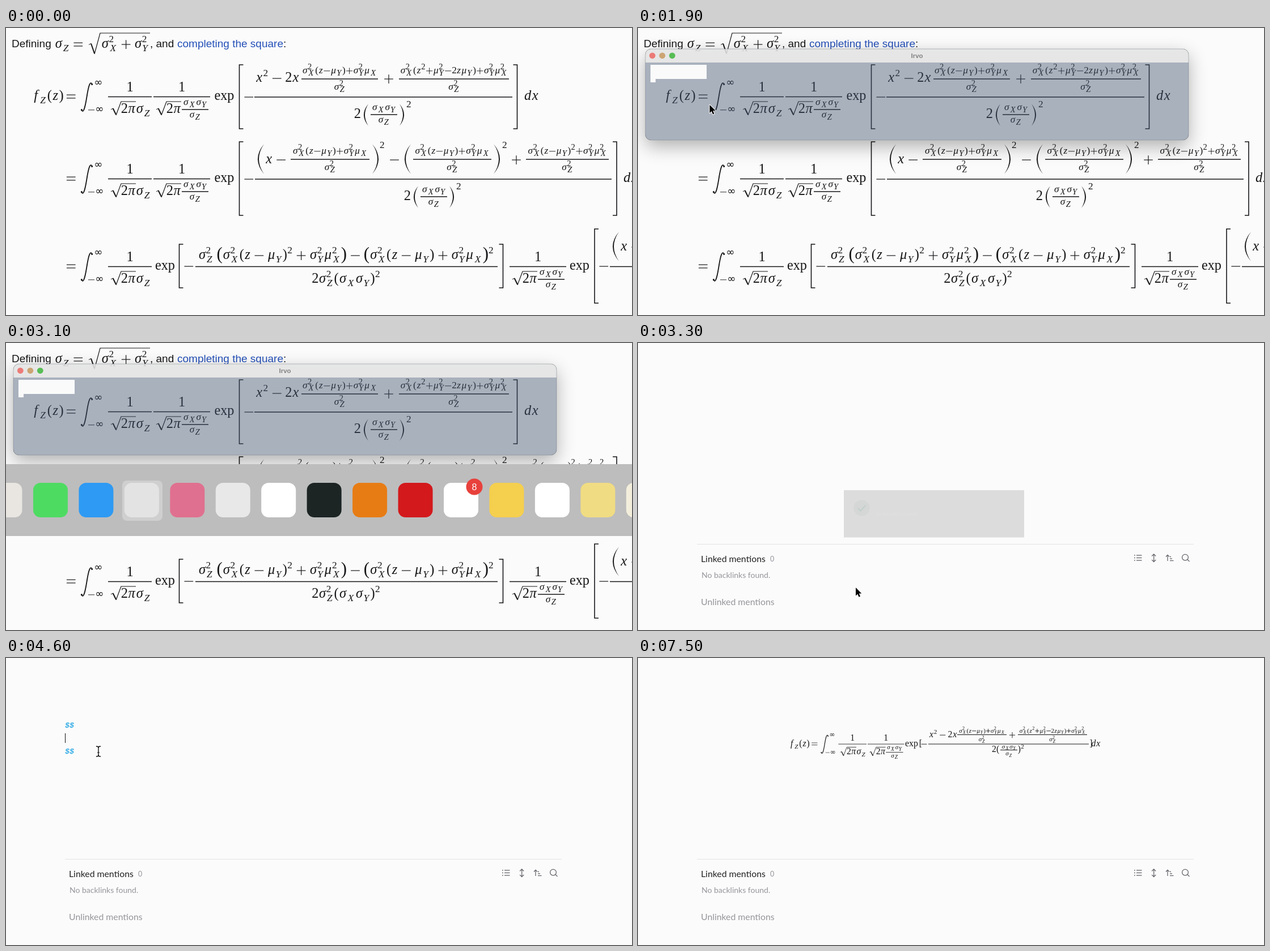
Write an HTML page with a canvas that moves like this. It is 1104 px wide and 507 px high and loops after 7600 ms.

```html
<!DOCTYPE html>
<html lang="en">
<meta charset="utf-8">
<title>Formula capture</title>
<style>
html, body { margin: 0; height: 100%; overflow: hidden; background: #fbfbfb }
canvas { display: block }
</style>
<canvas id="stage" width="1104" height="507"></canvas>
<script>
const c = document.getElementById('stage').getContext('2d');
const SANS = '"Liberation Sans", sans-serif', SERIF = '"Liberation Serif", serif';
const HAND = 'Lato, sans-serif', MONO = '"Liberation Mono", monospace';
const INK = '#161618', LOOP = 7600, STEP = 100, EM = 23.8, SCRIPT = 16.8;

// Advance widths in em for mathematical setting
const ADV = { σ: .571, μ: .603, π: .57, X: .85, Y: .64, Z: .71, x: .572, z: .48, f: .55, d: .52,
  '(': .389, ')': .389, '{': .458, '}': .458, '+': .778, '−': .778, '=': .778, '∞': .95, ' ': .222 };

function text(s, x, y, font, color = INK, align = 'left') {
  c.font = font; c.fillStyle = color; c.textAlign = align;
  c.fillText(s, x, y);
}
function box(x, y, w, h, color, r = 0) {
  c.fillStyle = color;
  c.beginPath(); c.roundRect(x, y, w, h, r); c.fill();
}
function disc(x, y, r, color) {
  c.fillStyle = color;
  c.beginPath(); c.arc(x, y, r, 0, 7); c.fill();
}
function line(pts, w = 1.3, color = INK) {
  c.strokeStyle = color; c.lineWidth = w;
  c.beginPath(); pts.forEach(p => c.lineTo(...p)); c.stroke();
}
const bar = (x1, x2, y, w = 1.3) => line([[x1, y], [x2, y]], w);

function glyph(ch, x, y, z) {
  const a = y - .25 * z, h = .33 * z, t = Math.max(.9, .05 * z);
  if (ch === ' ') return;
  if (ch === '=') { bar(x - h, x + h, a - .12 * z, t); bar(x - h, x + h, a + .12 * z, t); return; }
  if (ch === '−' || ch === '+') {
    bar(x - h, x + h, a, t);
    if (ch === '+') line([[x, a - h], [x, a + h]], t);
    return;
  }
  if (ch === '∞') return text(ch, x, y, `${z * 1.1}px "DejaVu Sans", sans-serif`, INK, 'center');
  if (ch === '{' || ch === '}') return text(ch === '{' ? '(' : ')', x, y + z * .06, `${z * 1.3}px ${SERIF}`, INK, 'center');
  const slant = /[a-zσμπ]/i.test(ch) ? 'italic ' : '';
  text(ch, x, y, `${slant}${z * 1.03}px ${SERIF}`, INK, 'center');
}
// Sets "a_b^c" markup from x on the baseline y; returns the right end
function run(s, x, y, z = EM, k = .707, draw = true) {
  let end = x;
  for (const [, mark, ch] of s.matchAll(/([_^]?)(.)/g)) {
    const q = mark ? z * k : z, w = (ADV[ch] || .5) * q;
    if (!mark) x = end;
    const dy = mark === '^' ? -.4 * z : mark ? .25 * z : 0;
    if (draw) glyph(ch, x + w / 2, y + dy, q);
    end = Math.max(end, x + w + (mark ? .05 * z : 0));
    if (!mark) x = end;
  }
  return end;
}
const mid = (s, x, y, z, k) => run(s, x - run(s, 0, 0, z, k, false) / 2, y, z, k);

function frac(x1, x2, y, num, den, up = 10, down = 19, z = SCRIPT, k = .84) {
  bar(x1, x2, y, z < 14 ? 1 : 1.3);
  mid(num, (x1 + x2) / 2, y - up, z, k);
  mid(den, (x1 + x2) / 2, y + down, z, k);
}
function bracket(x, y1, y2, dir) {
  line([[x + 7 * dir, y1], [x, y1], [x, y2], [x + 7 * dir, y2]], 1.6);
}
function paren(tip, bulge, y1, y2) {
  const m = (y1 + y2) / 2, k = 2 * bulge - tip, t = Math.sign(tip - bulge) * 4;
  c.fillStyle = INK;
  c.beginPath(); c.moveTo(tip, y1);
  c.quadraticCurveTo(k, m, tip, y2);
  c.quadraticCurveTo(k + t, m, tip, y1);
  c.fill();
}
function surd(x, w, x2, top, bot) {
  const m = bot - (bot - top) * .5;
  line([[x, m + 2], [x + w * .2, m]], 1);
  line([[x + w * .2, m], [x + w * .5, bot - 1]], 2);
  line([[x + w * .5, bot], [x + w, top], [x2, top]], 1.2);
}
function integral() {
  c.strokeStyle = INK; c.lineWidth = 1.8;
  c.beginPath(); c.moveTo(152, 99.5);
  c.bezierCurveTo(149, 93, 146, 99, 142.5, 121.5);
  c.bezierCurveTo(139, 144, 136, 151, 133, 144.5);
  c.stroke();
  disc(151.6, 99.5, 1.5, INK); disc(133.4, 144.5, 1.5, INK);
  run('∞', 155, 102, SCRIPT);
  run('−∞', 144, 149, SCRIPT);
}
function at(dx, dy, draw, s = 1) {
  c.save(); c.translate(dx, dy); c.scale(s, s); draw(); c.restore();
}
function head() {
  run('=', 105.5, 127);
  integral();
  bar(180, 257, 121.5);
  mid('1', 218.5, 112, EM);
  surd(185, 18, 229, 130, 154);
  run('2π', 203, 150);
  run('σ_Z', 229, 150);
}
function scaledOne() {
  bar(260, 360, 121.5);
  mid('1', 310, 112, EM);
  surd(265, 18, 309, 130, 154);
  run('2π', 283, 150);
  frac(310, 357, 144, 'σ_Xσ_Y', 'σ_Z', 8, 14);
}
function squareBelow() {
  run('2', 614, 159);
  paren(639, 631, 134, 173);
  frac(643, 690, 153, 'σ_Xσ_Y', 'σ_Z', 8, 14);
  paren(694, 702, 134, 173);
  run('2', 706, 140, SCRIPT);
}
const exp = (x, y, z = 24.2) => text('exp', x, y, `${z}px ${SERIF}`);
const MEAN = 'σ_X^2(z−μ_Y)+σ_Y^2μ_X', VAR = 'σ_Z^2';
const TAIL = 'σ_X^2(z^2+μ_Y^2−2zμ_Y)+σ_Y^2μ_X^2';

function article() {
  const body = `19px ${SANS}`;
  text('Defining', 10, 34, body);
  run('σ_Z =', 86, 35);
  surd(146, 20, 254, 9, 46);
  run('σ_X^2 + σ_Y^2', 168, 35);
  text(', and', 254, 34, body);
  text('completing the square', 302, 34, body, '#2450b8');
  text(':', 489, 34, body);

  run('f_Z(z)', 46, 127);
  head(); scaledOne();
  exp(367.5, 127);
  bracket(411.5, 65, 178, 1);
  run('−', 419, 128);
  bar(438, 893, 122);
  run('x^2 − 2x', 440, 95);
  frac(521, 656, 90, MEAN, VAR);
  mid('+', 675, 96, EM);
  frac(693, 887, 90, TAIL, VAR);
  squareBelow();
  bracket(901.5, 65, 178, -1);
  run('dx', 914, 127);

  at(0, 145, () => { head(); scaledOne(); });
  exp(367.5, 272);
  bracket(411.5, 201, 331, 1);
  run('−', 419, 273);
  bar(439, 1068, 267);
  paren(455, 444, 205, 258);
  run('x −', 457, 239);
  frac(502, 641, 232, MEAN, VAR);
  paren(646, 657, 205, 258);
  run('2', 659, 212, SCRIPT);
  mid('−', 685, 239, EM);
  paren(714, 703, 205, 258);
  frac(718, 856, 232, MEAN, VAR);
  paren(860, 871, 205, 258);
  run('2', 875, 212, SCRIPT);
  mid('+', 900, 239, EM);
  frac(917, 1063, 232, 'σ_X^2(z−μ_Y)^2+σ_Y^2μ_X^2', VAR);
  at(88, 145, squareBelow);
  bracket(1077, 201, 331, -1);
  run('dx', 1089, 272);

  at(0, 300, head);
  exp(263, 427);
  bracket(305.5, 382, 459, 1);
  run('−', 313, 427);
  bar(334, 867, 421.5);
  mid('σ_Z^2 {σ_X^2(z − μ_Y)^2 + σ_Y^2μ_X^2} − {σ_X^2(z − μ_Y) + σ_Y^2μ_X}^2', 600, 408, EM);
  mid('2σ_Z^2(σ_Xσ_Y)^2', 600, 450, EM);
  bracket(876.5, 382, 459, -1);
  at(628, 300, scaledOne);
  exp(994, 427);
  bracket(1038, 355, 486, 1);
  run('−', 1045, 427);
  bar(1065, 1104, 421.5);
  paren(1081, 1070, 360, 412);
  run('x −', 1083, 393);
}

// Linear interpolation through [time, ...values] keys
function track(keys, t) {
  let i = keys.findIndex(k => k[0] > t);
  if (i < 0) return keys[keys.length - 1].slice(1);
  i = Math.max(i, 1);
  const a = keys[i - 1], b = keys[i], u = Math.max(0, (t - a[0]) / (b[0] - a[0]));
  return a.slice(1).map((v, n) => v + (b[n + 1] - v) * u);
}
const FRAME = [[300, 75, 75, 1040, 425], [700, 13, 37, 998, 415], [800, 13, 37, 998, 415], [1100, 13, 37, 971, 198]];
const ARROW = [[300, 557, 87], [700, 506, 49], [800, 998, 415], [1100, 971, 198], [1300, 57, 82], [1700, 57, 82], [2400, 300, 270]];
const POINTER = [[3600, 384, 432], [4100, 163, 165], [5200, 163, 165], [6000, 212, 65], [6100, 212, 65], [6700, 571, 31]];

function appWindow(t) {
  const [x, y, r, b] = track(FRAME, t), w = r - x, h = b - y;
  const shape = () => c.roundRect(x, y, w, h, 10);
  c.save();
  c.beginPath(); c.rect(0, 0, 1104, 507); shape(); c.clip('evenodd');
  c.shadowColor = 'rgba(0,0,0,.3)'; c.shadowBlur = 32; c.shadowOffsetY = 11;
  c.fillStyle = '#000'; c.beginPath(); shape(); c.fill();
  c.restore();
  c.save();
  c.beginPath(); shape(); c.clip();
  box(x, y, w, 24, 'rgba(228,228,228,.88)');
  box(x, y + 24, w, h - 24, 'rgba(65,83,111,.44)');
  c.restore();
  c.strokeStyle = 'rgba(110,115,125,.45)'; c.lineWidth = 1;
  c.beginPath(); shape(); c.stroke();
  ['#ec7b78', '#cda473', '#58bd55'].forEach((color, i) => disc(x + 12.3 + i * 17.5, y + 11.8, 5.4, color));
  text('Irvo', x + w / 2, y + 15.5, `bold 11.5px ${SANS}`, '#838383', 'center');
  if (t >= 1700) {
    box(22, 65, 99, 25, '#fafafa');
    box(22, 90, 9, 6, '#fafafa');
    return;
  }
  const hot = t >= 1300, label = `9.1px ${SANS}`;
  box(x + 13, y + 32, 55, 17, hot ? '#fdfdfd' : '#858c9a');
  if (hot) {
    c.setLineDash([2, 1]); c.strokeStyle = '#8a919e';
    c.strokeRect(x + 13.5, y + 32.5, 54, 16); c.setLineDash([]);
  }
  text('Screenshot', x + 40.5, y + 43.5, label, hot ? '#9a9fa8' : '#f4f4f4', 'center');
  box(x + 79, y + 32, 24, 17, '#858c9a');
  text('Exit', x + 90, y + 43.5, label, '#f4f4f4', 'center');
}
const ICONS = ['#e9e6e1', '#4edb62', '#2e9af3', '#e3e3e3', '#e0708f', '#e8e8e8', '#fff', '#1c2424',
  '#e77c14', '#d3191c', '#fff', '#f5cf4e', '#fff', '#f0dc82', '#f3eedb'];
function switcher() {
  box(0, 214, 1104, 127, '#bdbdbd');
  box(205, 243, 71, 71, '#cfcfcf', 8);
  ICONS.forEach((color, i) => box(-32.5 + i * 80.45, 247, 61, 61, color, 13));
  disc(826, 254, 14.5, '#e8413c');
  text('8', 826, 259.5, `16px ${SANS}`, '#fff', 'center');
}
function arrow([x, y]) {
  c.beginPath();
  [[0, 0], [0, 14.5], [3.3, 11.4], [5.6, 16.8], [8, 15.8], [5.8, 10.6], [10.3, 10.4]]
    .forEach(([u, v]) => c.lineTo(x + u, y + v));
  c.closePath();
  c.lineJoin = 'round'; c.strokeStyle = '#fff'; c.lineWidth = 2; c.stroke();
  c.fillStyle = '#000'; c.fill(); c.lineJoin = 'miter';
}
function beam([x, y]) {
  for (const s of [-1, 1]) line([[x - 4, y + 9 * s], [x - 1, y + 8.5 * s], [x, y + 7 * s], [x + 1, y + 8.5 * s], [x + 4, y + 9 * s]], 1.4, '#111');
  line([[x, y - 8], [x, y + 8]], 1.4, '#111');
  bar(x - 2, x + 2, y + 2, 1);
}
const caret = (x, y) => box(x, y, 1, 17, '#111');

function panel() {
  const grey = '#95959b', pen = (...pts) => line(pts, 1.3, '#66666c');
  box(104, 355, 876, 1, '#e3e3e5');
  text('Linked mentions', 111, 387, `15.8px ${HAND}`, '#222');
  text('0', 233, 386, `12.5px ${HAND}`, grey);
  text('No backlinks found.', 112, 415, `14px ${HAND}`, grey);
  text('Unlinked mentions', 111, 463, `15.8px ${HAND}`, grey);
  for (const y of [375, 379.5, 384]) {
    pen([875, y], [876.8, y]);
    pen([879, y], [888.5, y]);
  }
  pen([909.7, 373.5], [909.7, 386]);
  pen([906.2, 376.5], [909.7, 373], [913.2, 376.5]);
  pen([906.2, 383], [909.7, 386.5], [913.2, 383]);
  pen([934, 385], [934, 374.5]);
  pen([931, 377.5], [934, 374.5], [937, 377.5]);
  pen([938, 377.5], [940, 377.5]);
  pen([938, 381], [942, 381]);
  pen([938, 384.5], [944.5, 384.5]);
  c.beginPath(); c.arc(965, 378.7, 5.4, 0, 7); c.stroke();
  pen([969, 382.5], [972.5, 386]);
}
function rendered() {
  const z = 15.3, s = 10.8, k = .73;
  run('f_Z(z)', 267, 156, z);
  at(237.3, 73.7, () => { head(); scaledOne(); }, .645);
  exp(471, 156, 15.8);
  run('[', 494.5, 156, z);
  run('−', 498.5, 156, z);
  bar(512, 795, 152, 1);
  run('x^2 − 2x', 513, 140, z);
  frac(563, 650, 135.5, MEAN, VAR, 4, 11.5, s, k);
  mid('+', 660, 140, z);
  frac(670, 792, 135.5, TAIL, VAR, 4, 11.5, s, k);
  run('2(', 624, 166, z);
  frac(639, 669, 162.5, 'σ_Xσ_Y', 'σ_Z', 3, 9.5, s, k);
  run(')^2', 669.5, 166, z);
  run(']', 795, 156, z);
  run('dx', 799.5, 156, z);
}
const LATEX = [
  String.raw`f_{Z}(z)=\int_{-\infty}^{\infty} \frac{1}{\sqrt{2 \pi} \sigma_{Z}} \frac{1}{\sqrt{2 \pi} \frac{\sigma_{X} \sigma_{Y}}{\sigma_{Z}}}`,
  String.raw`\exp [-\frac{x^{2}-2 x \frac{\sigma_{X}^{2}(z-\mu_{Y})+\sigma_{Y}^{2} \mu_{X}}{\sigma_{Z}^{2}}`,
  String.raw`+\frac{\sigma_{X}^{2}(z^{2}+\mu_{Y}^{2}-2 z \mu_{Y})+\sigma_{Y}^{2} \mu_{X}^{2}}{\sigma_{Z}^{2}}}{2(\frac{\sigma_{X} \sigma_{Y}}{\sigma_{Z}})^{2}}] d x`];
const dollars = y => text('$$', 104, y, `italic bold 13.3px ${MONO}`, '#35ade6');

function note(t) {
  panel();
  if (t >= 6000) {
    rendered();
    if (t < 7000 || t >= 7300 && t < 7500) caret(104, 43);
  } else if (t >= 5200) {
    dollars(123);
    LATEX.forEach((s, i) => text(s, 104, 147 + i * 22.7, `12.5px ${MONO}`, '#333'));
    dollars(214);
  } else if (t >= 4400) {
    dollars(123); dollars(169);
    caret(104, 133);
  } else if (t >= 4100) {
    if (t >= 4200) dollars(123);
    caret(t >= 4200 ? 121 : 104, 110);
  }
}
function toast(t) {
  const [a] = track([[3200, 0], [3700, .715], [3900, .715], [4200, 0]], t);
  if (!a) return;
  c.globalAlpha = a;
  box(363, 260, 318, 83.5, '#222');
  disc(394.5, 291.5, 14, '#a4b5ad');
  line([[388, 292], [392.5, 296.5], [401, 287]], 1.6, '#2d9c87');
  text('Screenshot saved!', 419, 305, `9px ${SANS}`, '#fff');
  c.globalAlpha = 1;
}
function draw(t) {
  box(0, 0, 1104, 507, '#fbfbfb');
  if (t < 3200) {
    article();
    if (t >= 100) appWindow(t);
    if (t >= 2500) switcher();
    else if (t >= 100) arrow(track(ARROW, t));
    return;
  }
  note(t);
  toast(t);
  const p = track(POINTER, t);
  if (t < 6800) (p[1] > 345 ? arrow : beam)(p);
}
let last = -1;
function tick(now) {
  const t = Math.floor(now % LOOP / STEP) * STEP;
  if (t !== last) draw(last = t);
  requestAnimationFrame(tick);
}
draw(0);
requestAnimationFrame(tick);
</script>
</html>
```
